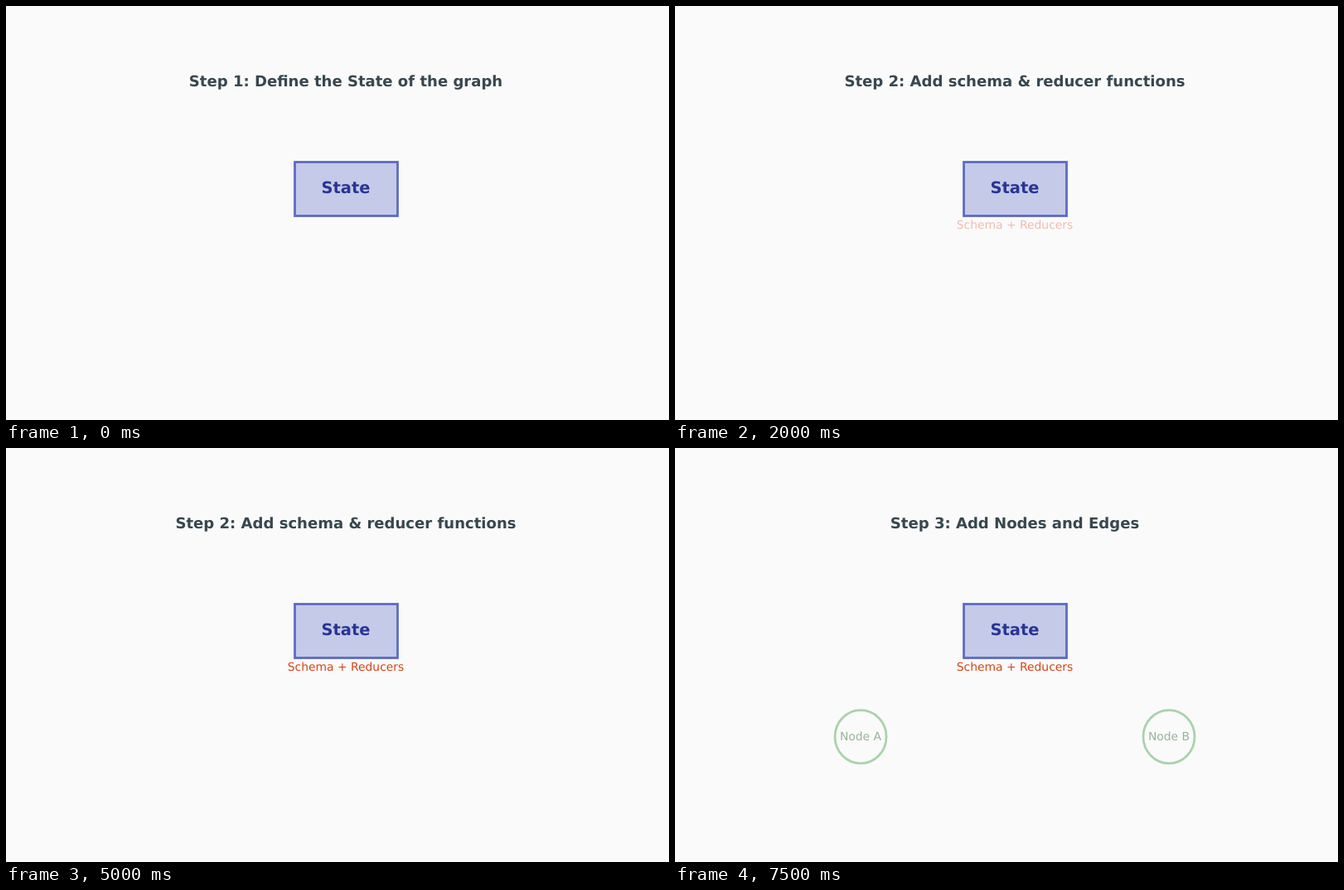
An HTML page that plays this animation: 800 px wide and 500 px high, repeating every 8 s.

```html
<!DOCTYPE html>
<html lang="en">
<head>
<meta charset="utf-8">
<title>Building a state graph</title>
<style>
  html, body { margin: 0; width: 100%; height: 100%; overflow: hidden; background: #fafafa; }
  svg { display: block; width: 800px; height: 500px; }
  text { font: 13.89px "DejaVu Sans", sans-serif; text-anchor: middle; text-rendering: geometricPrecision; }
  #title { font-size: 18.06px; font-weight: bold; fill: #37474f; }
  #state { font-size: 19.44px; font-weight: bold; fill: #283593; }
  #schema { fill: #d84315; }
  rect { fill: #c5cae9; stroke: #5c6bc0; stroke-width: 2.78; }
  ellipse { fill: none; stroke: #43a047; stroke-width: 2.78; }
  .node text { fill: #1b5e20; }
</style>
</head>
<body>
<svg viewBox="0 0 800 500">
  <text id="title" x="410" y="97"></text>
  <rect x="348.5" y="188.5" width="124" height="65"/>
  <text id="state" x="410" y="226">State</text>
  <text id="schema" x="410" y="269">Schema + Reducers</text>
  <g class="node">
    <ellipse cx="224" cy="348.75" rx="31" ry="32.08"/>
    <text x="224" y="353">Node A</text>
  </g>
  <g class="node">
    <ellipse cx="596" cy="348.75" rx="31" ry="32.08"/>
    <text x="596" y="353">Node B</text>
  </g>
</svg>
<script>
  const LOOP = 8000, TICK = 500, FADE_TICKS = 9;
  const SCHEMA_START = 1, NODES_START = 11;
  const titles = [
    "Step 1: Define the State of the graph",
    "Step 2: Add schema & reducer functions",
    "Step 3: Add Nodes and Edges"
  ];
  const title = document.getElementById("title");
  const schema = document.getElementById("schema");
  const nodes = document.querySelectorAll(".node");

  const fade = (tick, start) => Math.min(1, Math.max(0, (tick - start) / FADE_TICKS));

  function render(time) {
    const tick = Math.floor((time % LOOP) / TICK);
    const step = tick < SCHEMA_START ? 0 : tick < NODES_START ? 1 : 2;
    if (title.textContent !== titles[step]) title.textContent = titles[step];
    schema.style.opacity = fade(tick, SCHEMA_START);
    // Outline and label fade separately, as each has its own alpha.
    for (const node of nodes)
      for (const part of node.children) part.style.opacity = fade(tick, NODES_START);
  }

  const start = performance.now();
  function loop() {
    render(performance.now() - start);
    requestAnimationFrame(loop);
  }
  loop();
</script>
</body>
</html>
```
